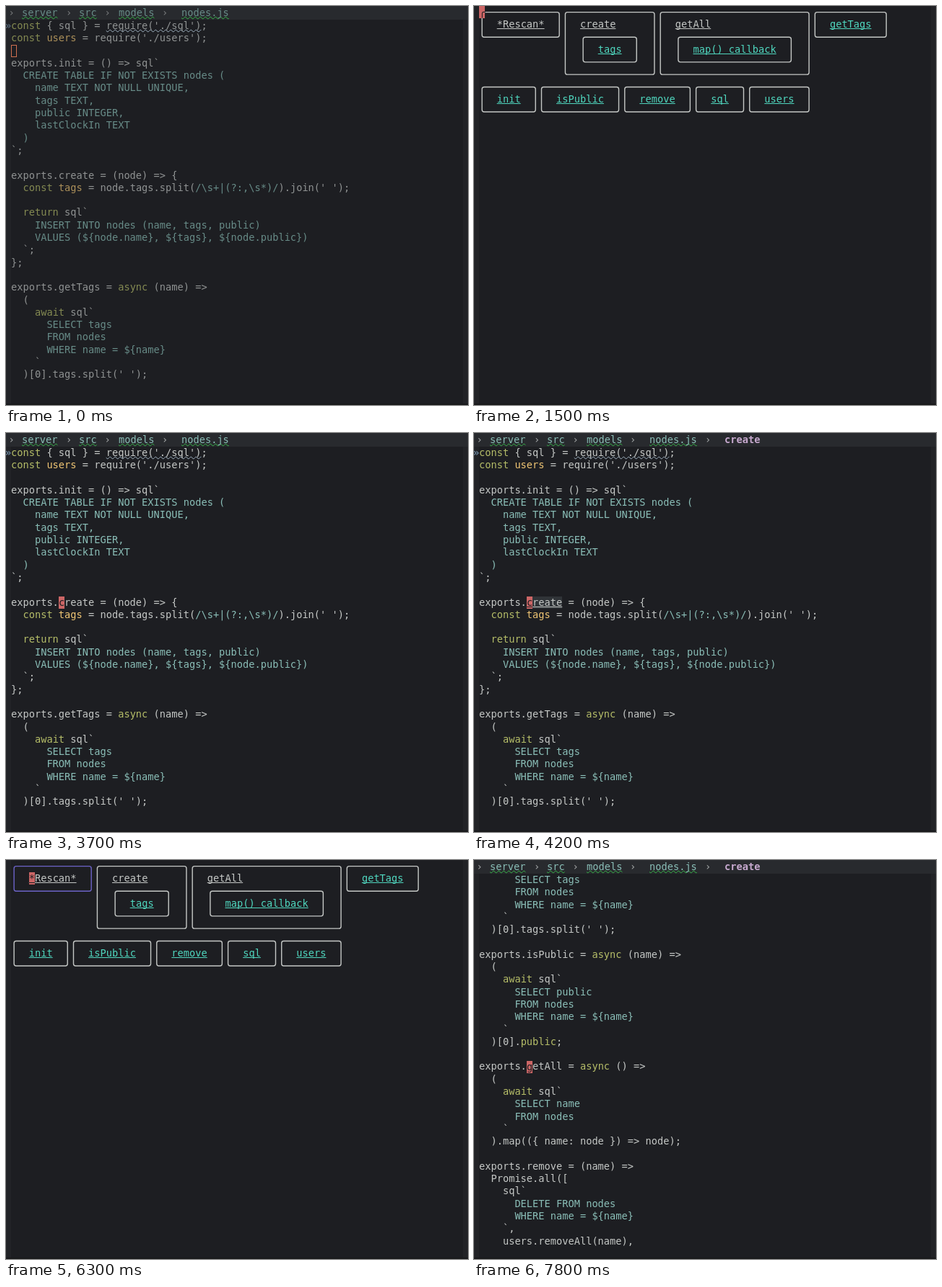
Animation, 640 px wide and 554 px high, one loop 8 s. Source, as an HTML page:

```html
<!DOCTYPE html>
<html lang="en">
<head>
<meta charset="utf-8">
<title>Code map</title>
<style>
  :root {
    --bg: #1d1e22; --fg: #c5c8c6; --teal: #8abeb7; --red: #cc6666;
    --cw: 8.236px; --lh: 17.3px; --lit: 100%;
  }
  html, body { margin: 0; width: 100%; height: 100%; overflow: hidden; background: var(--bg); }
  #stage {
    position: relative; width: 640px; height: 554px; overflow: hidden; background: var(--bg);
    font: 13.68px/17.3px "DejaVu Sans Mono", monospace; color: var(--fg);
    font-variant-ligatures: none;
  }
  #stage * { box-sizing: border-box; }
  #stage div, #stage pre, #stage svg { position: absolute; margin: 0; font: inherit; }
  #editor, #map, #map svg { left: 0; top: 0; width: 640px; height: 554px; }
  .fringe { top: 0; height: 554px; width: 7px; background: #222327; }
  .foot { left: 0; top: 552px; width: 640px; height: 2px; background: #18191b; }

  /* text that dims while the window is not focused */
  #code, #code span, #head span, #mark { color: color-mix(in srgb, var(--c, var(--fg)) var(--lit), var(--bg)); }
  #code .str { --c: var(--teal); }
  #code .key { --c: #b5bd68; }
  #code .var { --c: #f0c674; }
  .wavy { text-decoration: underline wavy 1px #9db0c0; text-underline-offset: 0; text-decoration-skip-ink: none; }

  #head { left: 0; top: 0; width: 640px; height: 19px; background: #282a2e; }
  #head span { position: absolute; top: 1px; white-space: pre; }
  #head .dir { --c: var(--teal); text-decoration: underline wavy 1px #35b548; text-underline-offset: 0; text-decoration-skip-ink: none; }
  #head .sep { --c: #a5a8a8; transform: translateX(-50%); }
  #head #crumb { --c: #c7a9cf; font-weight: bold; }
  #pane { left: 7px; top: 19px; width: 626px; height: 519px; overflow: hidden; }
  #code { left: 0; top: 0; }
  #mark { left: -1px; top: 19px; --c: #81a2be; }
  #glow { left: calc(7px + 8 * var(--cw)); top: calc(19px + 12 * var(--lh)); height: 17px; background: #303438; color: var(--fg); text-decoration: underline; z-index: 1; }

  rect { fill: none; stroke: #c5c8c6; stroke-width: 1.4; }
  rect.on { stroke: #6c63c8; }
  .label { left: calc(7px + var(--x) * var(--cw)); top: calc(var(--y) * var(--lh)); white-space: pre; text-decoration: underline; text-decoration-skip-ink: none; }
  .link { color: #4fd6be; }

  #cursor { width: 8.3px; height: 17px; background: var(--red); color: var(--bg); z-index: 2; }
  #cursor.hollow { background: none; border: 1px solid #d0704f; }
</style>
</head>
<body>
<div id="stage">
  <div class="fringe" style="left:0"></div>
  <div class="fringe" style="left:633px"></div>
  <div id="editor">
    <div id="head"></div>
    <div id="mark">»</div>
    <div id="glow">create</div>
    <div id="pane"><pre id="code">
const { sql } = require('./sql');
const users = require('./users');

exports.init = () => sql`
  CREATE TABLE IF NOT EXISTS nodes (
    name TEXT NOT NULL UNIQUE,
    tags TEXT,
    public INTEGER,
    lastClockIn TEXT
  )
`;

exports.create = (node) => {
  const tags = node.tags.split(/\s+|(?:,\s*)/).join(' ');

  return sql`
    INSERT INTO nodes (name, tags, public)
    VALUES (${node.name}, ${tags}, ${node.public})
  `;
};

exports.getTags = async (name) =>
  (
    await sql`
      SELECT tags
      FROM nodes
      WHERE name = ${name}
    `
  )[0].tags.split(' ');

exports.isPublic = async (name) =>
  (
    await sql`
      SELECT public
      FROM nodes
      WHERE name = ${name}
    `
  )[0].public;

exports.getAll = async () =>
  (
    await sql`
      SELECT name
      FROM nodes
    `
  ).map(({ name: node }) => node);

exports.remove = (name) =>
  Promise.all([
    sql`
      DELETE FROM nodes
      WHERE name = ${name}
    `,
    users.removeAll(name),
</pre></div>
  </div>
  <div id="map"><svg id="frames"></svg></div>
  <div id="cursor"></div>
  <div class="foot"></div>
</div>
<script>
const $ = id => document.getElementById(id);
const CW = 8.236, LH = 17.3, LOOP = 8000;

function add(parent, tag, cls, text, style) {
  const el = parent.appendChild(document.createElement(tag));
  el.className = cls;
  el.textContent = text;
  el.style.cssText = style;
  return el;
}

// syntax colours: template bodies, then the rest by pattern
const span = (cls, s) => `<span class="${cls}">${s}</span>`;
const paint = s => s
  .replace(/\/\\s.*?\*\)\//g, m => span('str', m))
  .replace(/\bconst (\w+)/g, (m, name) => 'const ' + span('var', name))
  .replace(/\b(const|return|async|await)\b/g, m => span('key', m))
  .replace(/\]\.public/, m => '].' + span('key', 'public'))
  .replace("require('./sql')", m => span('wavy', m));
$('code').innerHTML = $('code').innerHTML.split('`')
  .map((part, i) => i % 2 ? span('str', part) : paint(part)).join('`');

// breadcrumb
for (const [x, name] of [[22, 'server'], [101, 'src'], [156, 'models'], [243, 'nodes.js']])
  add($('head'), 'span', 'dir', name, `left:${x}px`);
for (const x of [7.5, 87, 140.5, 220]) add($('head'), 'span', 'sep', '›', `left:${x}px`);
const crumb = [
  add($('head'), 'span', 'sep', '›', 'left:324px'),
  add($('head'), 'span', '', 'create', 'left:347px')
];
crumb[1].id = 'crumb';

// a rounded frame through the middle of its edge cells
function frame(x, y, w, h) {
  const el = document.createElementNS('http://www.w3.org/2000/svg', 'rect');
  const attrs = { x: 7 + (x + .5) * CW, y: (y + .5) * LH, width: (w - 1) * CW, height: (h - 1) * LH, rx: 3 };
  for (const k in attrs) el.setAttribute(k, attrs[k]);
  return $('frames').appendChild(el);
}

// map boxes: label, column, row, width, height
const boxes = {};
for (const [name, x, y, w, h] of [
  ['*Rescan*', 0, 0, 14, 3], ['create', 14, 0, 16, 6], ['tags', 17, 2, 10, 3],
  ['getAll', 30, 0, 26, 6], ['map() callback', 33, 2, 20, 3], ['getTags', 56, 0, 13, 3],
  ['init', 0, 6, 10, 3], ['isPublic', 10, 6, 14, 3], ['remove', 24, 6, 12, 3],
  ['sql', 36, 6, 9, 3], ['users', 45, 6, 11, 3]
]) {
  boxes[name] = frame(x, y, w, h);
  const plain = h > 3 || name === '*Rescan*';
  add($('map'), 'div', plain ? 'label' : 'label link', name, `--x:${x + 3};--y:${y + 1}`);
}

// start, view, cursor column, row, character, extras
const steps = [
  [0, 'code', 0, 2, '', { hollow: true }],
  [600, 'code', 0, 2, ''],
  [1500, 'map', 0, 0, '╭'],
  [2700, 'map', 3, 1, '*', { on: '*Rescan*' }],
  [3000, 'map', 17, 1, 'c', { on: 'create' }],
  [3700, 'code', 8, 12, 'c'],
  [4200, 'code', 8, 12, 'c', { crumb: true, glow: true }],
  [5500, 'map', 0, 0, '╭'],
  [6300, 'map', 3, 1, '*', { on: '*Rescan*' }],
  [6600, 'map', 17, 1, 'c', { on: 'create' }],
  [6900, 'map', 33, 1, 'g', { on: 'getAll' }],
  [7600, 'code', 8, 15, 'g', { crumb: true, top: 24 }]
];
const show = (el, yes) => { el.style.display = yes ? '' : 'none'; };
let current;

function apply([, view, col, row, char, opt = {}]) {
  const code = view === 'code', top = opt.top || 0;
  show($('editor'), code);
  show($('map'), !code);
  show($('glow'), opt.glow);
  show($('mark'), !top);
  crumb.forEach(el => show(el, opt.crumb));
  $('code').style.top = -top * LH + 'px';
  for (const name in boxes) boxes[name].classList.toggle('on', name === opt.on);
  if (opt.on) $('frames').append(boxes[opt.on]);
  const cur = $('cursor');
  cur.className = opt.hollow ? 'hollow' : '';
  cur.textContent = char;
  cur.style.left = 7 + col * CW + 'px';
  cur.style.top = row * LH + (code ? 19 : 0) + 'px';
  cur.style.textDecoration = opt.on || opt.glow ? 'underline' : 'none';
}

function draw(now) {
  const t = now % LOOP;
  const step = steps.findLast(s => s[0] <= t);
  if (step !== current) apply(current = step);
  // focus fades in over four ticks
  const tick = Math.max(0, Math.min(4, Math.floor((t - 500) / 100)));
  $('stage').style.setProperty('--lit', 68 + 8 * tick + '%');
  requestAnimationFrame(draw);
}
draw(performance.now());
</script>
</body>
</html>
```
